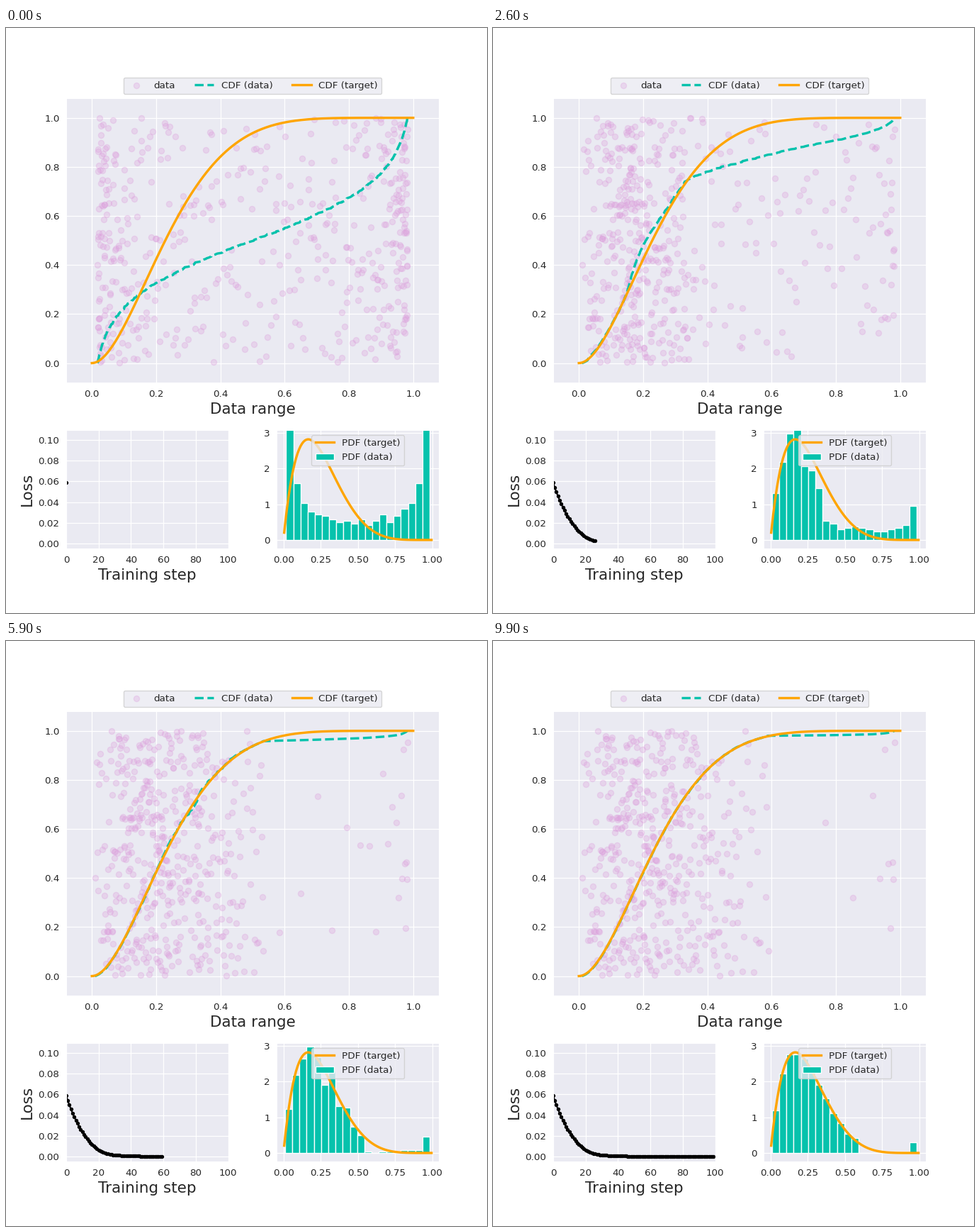
Animation, 679 px wide and 825 px high, one loop 10 s. Source, as a matplotlib script:

```python
import numpy as np
import matplotlib.pyplot as plt
from matplotlib.animation import FuncAnimation

N, STEPS, BINS = 500, 100, 20
DPI = 97
TEAL, ORANGE, PINK = "#06c2ac", "orange", "plum"

plt.rcParams.update({
    "font.family": "DejaVu Sans", "font.size": 10,
    "axes.facecolor": "#eaeaf2", "axes.edgecolor": "white",
    "axes.grid": True, "axes.axisbelow": True, "axes.labelsize": 16,
    "grid.color": "white", "grid.linewidth": 0.9,
    "text.color": ".15", "axes.labelcolor": ".15",
    "xtick.color": ".15", "ytick.color": ".15",
    "xtick.major.size": 0, "ytick.major.size": 0,
    "xtick.major.pad": 7, "ytick.major.pad": 7,
})


def sigmoid(z):
    return 1 / (1 + np.exp(-z))


def cdf(x):
    """Beta(2, 6) distribution function."""
    return 1 - (1 - x) ** 6 * (1 + 6 * x)


def pdf(x):
    return 42 * x * (1 - x) ** 5


def start_logits(rng):
    """Evenly spread logits in [-4, 4] with some jitter, sorted."""
    u = (np.arange(N) + 0.5 + rng.normal(0, 1.5, N)) / N
    return np.sort(8 * np.clip(u, 0.001, 0.999) - 4)


def train(z, lr=0.1, b1=0.9, b2=0.999):
    """Adam on the logits; returns positions and loss per step."""
    grid = np.linspace(0.0005, 0.9995, 1000)
    weight = pdf(grid) / pdf(grid).sum()
    m, v = np.zeros(N), np.zeros(N)
    xs, losses = [], []
    for t in range(1, STEPS + 1):
        x = sigmoid(z)
        xs.append(x)
        F = np.searchsorted(np.sort(x), grid) / N
        losses.append(np.sum(weight * (F - cdf(grid)) ** 2))
        rank = np.argsort(np.argsort(x)) + 1
        g = 0.75 * (N * cdf(x) - rank) * (1 - x) / np.sqrt(x)
        m = b1 * m + (1 - b1) * g
        v = b2 * v + (1 - b2) * g * g
        z = z - lr * (m / (1 - b1 ** t)) / (np.sqrt(v / (1 - b2 ** t)) + 1)
    return xs, losses


rng = np.random.default_rng(3)
xs, losses = train(start_logits(rng))
ys = rng.uniform(0, 1, N)
levels = np.linspace(0, 1, N)

fig = plt.figure(figsize=(679 / DPI, 825 / DPI), dpi=DPI, facecolor="white")
gs = fig.add_gridspec(3, 2, left=0.125, right=0.9, bottom=0.11, top=0.88,
                      hspace=0.4, wspace=0.3)
main = fig.add_subplot(gs[:2, :])
loss_ax = fig.add_subplot(gs[2, 0])
pdf_ax = fig.add_subplot(gs[2, 1])

# data and distribution functions
dots = main.scatter(xs[0], ys, color=PINK, alpha=0.3, label="data")
curve, = main.plot(xs[0], levels, "--", color=TEAL, lw=2.5,
                   label="CDF (data)")
t = np.linspace(0, 1, 200)
main.plot(t, cdf(t), color=ORANGE, lw=2.5, label="CDF (target)")
ticks = np.arange(6) / 5
main.set(xlim=(-0.08, 1.08), ylim=(-0.08, 1.08), xticks=ticks, yticks=ticks,
         xlabel="Data range")
main.legend(loc="upper center", bbox_to_anchor=(0.5, 1.09), ncol=3)

# loss
loss_line, = loss_ax.plot([], [], "k.-")
loss_ax.set(xlim=(0, 100), ylim=(-0.005, 0.1095),
            xticks=range(0, 101, 20), yticks=np.arange(6) / 50,
            xlabel="Training step", ylabel="Loss")

# densities
bars = pdf_ax.bar(np.arange(BINS) / BINS, np.zeros(BINS), 0.05, align="edge",
                  color=TEAL, edgecolor="white", lw=1, label="PDF (data)")
t = np.linspace(0.005, 0.995, 100)
target, = pdf_ax.plot(t, pdf(t), color=ORANGE, lw=2.5, label="PDF (target)")
pdf_ax.set(xlim=(-0.0445, 1.0445), ylim=(-0.243, 3.07),
           xticks=np.arange(5) / 4, yticks=range(4))
pdf_ax.legend(handles=[target, bars], loc="upper center")


def update(k):
    x = xs[k]
    dots.set_offsets(np.column_stack([x, ys]))
    curve.set_data(np.sort(x), levels)
    loss_line.set_data(range(k + 1), losses[:k + 1])
    density, edges = np.histogram(x, BINS, density=True)
    for bar, h, left in zip(bars, density, edges):
        bar.set(x=left, height=h, width=edges[1] - edges[0])
    return dots, curve, loss_line, *bars


anim = FuncAnimation(fig, update, frames=STEPS, interval=100, repeat=True,
                     repeat_delay=0, init_func=lambda: update(0))
plt.show()
```
